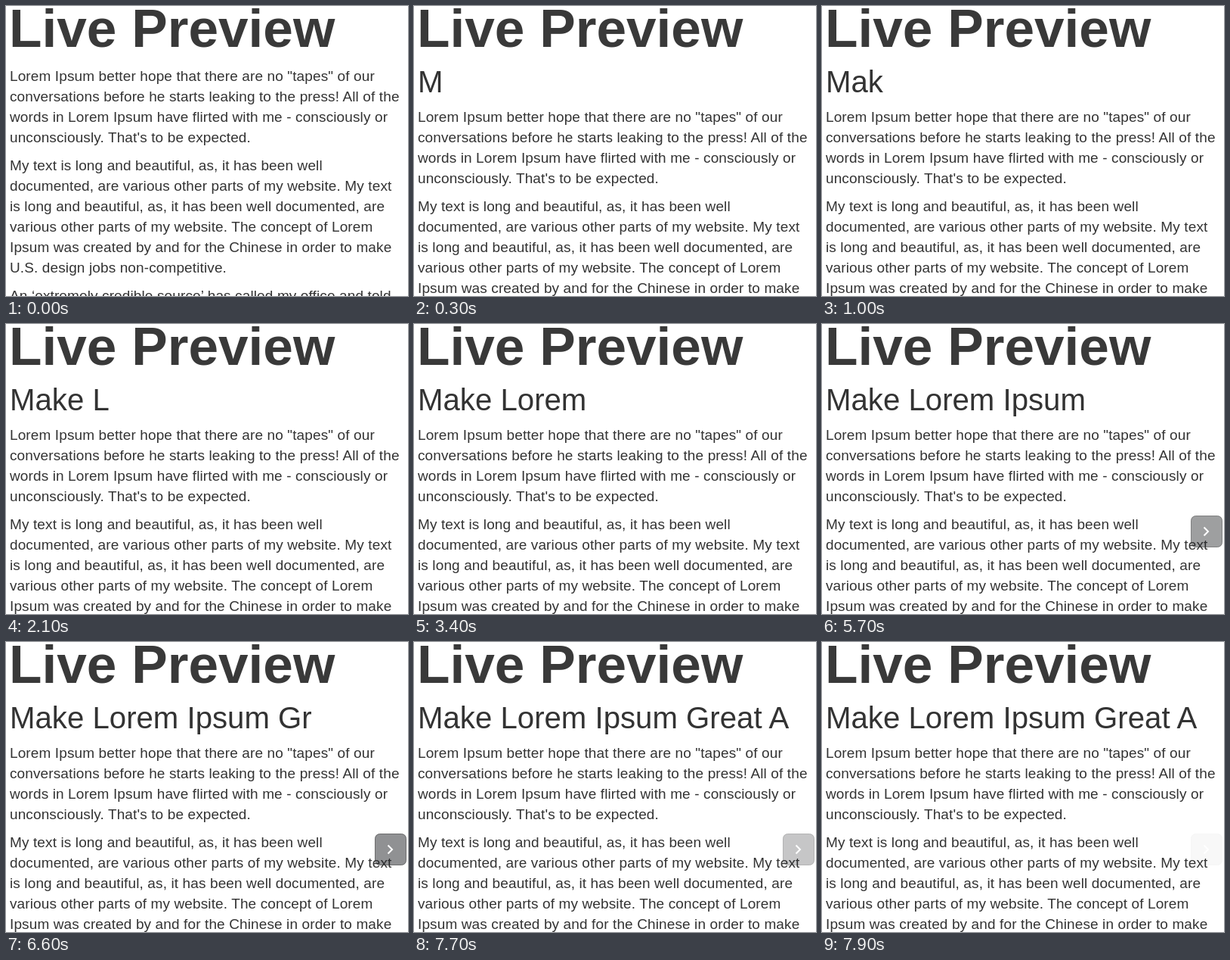
Recreate the animation shown at these times as an HTML page. Size 532x383 px, loop 8 s.

```html
<!DOCTYPE html>
<html lang="en">
<head>
<meta charset="utf-8">
<title>Live Preview</title>
<style>
  html, body { margin: 0; width: 100%; height: 100%; overflow: hidden; background: #fff; }
  body { position: relative; color: #333; font: 19px/27px "Liberation Sans", Arial, sans-serif; white-space: nowrap; }
  h1, h2, p { margin: 0; }
  h1 { position: absolute; left: 4px; top: -10px; color: #393939; font-size: 71.2px; line-height: 79px; }
  main { position: absolute; left: 5px; top: 79px; }
  h2 { height: 43px; margin-bottom: 11px; font-size: 40.2px; font-weight: normal; line-height: 43px; white-space: pre; }
  p { margin-bottom: 10px; letter-spacing: .12px; }
  #next { position: absolute; left: 488px; top: 253px; }
</style>
</head>
<body>
<h1>Live Preview</h1>
<main>
  <h2 id="heading"></h2>
  <p>Lorem Ipsum better hope that there are no "tapes" of our<br>
  conversations before he starts leaking to the press! All of the<br>
  words in Lorem Ipsum have flirted with me - consciously or<br>
  unconsciously. That's to be expected.</p>
  <p>My text is long and beautiful, as, it has been well<br>
  documented, are various other parts of my website. My text<br>
  is long and beautiful, as, it has been well documented, are<br>
  various other parts of my website. The concept of Lorem<br>
  Ipsum was created by and for the Chinese in order to make<br>
  U.S. design jobs non-competitive.</p>
  <p>An ‘extremely credible source’ has called my office and told</p>
</main>
<svg id="next" width="42" height="42">
  <rect x=".5" y=".5" width="41" height="41" rx="6" fill="#222528" fill-opacity=".5" stroke="#333" stroke-opacity=".6"/>
  <path d="M17.5 15.5l5.5 5.5-5.5 5.5" fill="none" stroke="#fff" stroke-width="2"/>
</svg>
<script>
  const LOOP = 8000, STEP = 100;
  // Each word is typed at an even pace from its start, one letter per beat
  const words = [
    { text: "Make", start: 300, beat: 300 },
    { text: " Lorem", start: 1775, beat: 325 },
    { text: " Ipsum", start: 3725, beat: 375 },
    { text: " Great", start: 5925, beat: 275 },
    { text: " A", start: 7500, beat: 200 }
  ];
  const heading = document.getElementById("heading");
  const next = document.getElementById("next");

  const typedPart = (word, t) =>
    word.text.slice(0, Math.max(0, Math.floor((t - word.start) / word.beat) + 1));

  // Eased progress from 0 to 1
  function easeOut(t, start, length) {
    const u = Math.min(1, Math.max(0, (t - start) / length));
    return 1 - (1 - u) ** 3;
  }

  function draw(now) {
    const t = Math.floor(now % LOOP / STEP) * STEP;
    const typed = words.map(word => typedPart(word, t)).join("");
    if (heading.textContent !== typed) heading.textContent = typed;
    heading.style.display = typed ? "block" : "none";
    next.style.opacity = easeOut(t, 5500, 400) - easeOut(t, 7600, 500);
    requestAnimationFrame(draw);
  }
  draw(performance.now());
</script>
</body>
</html>
```
